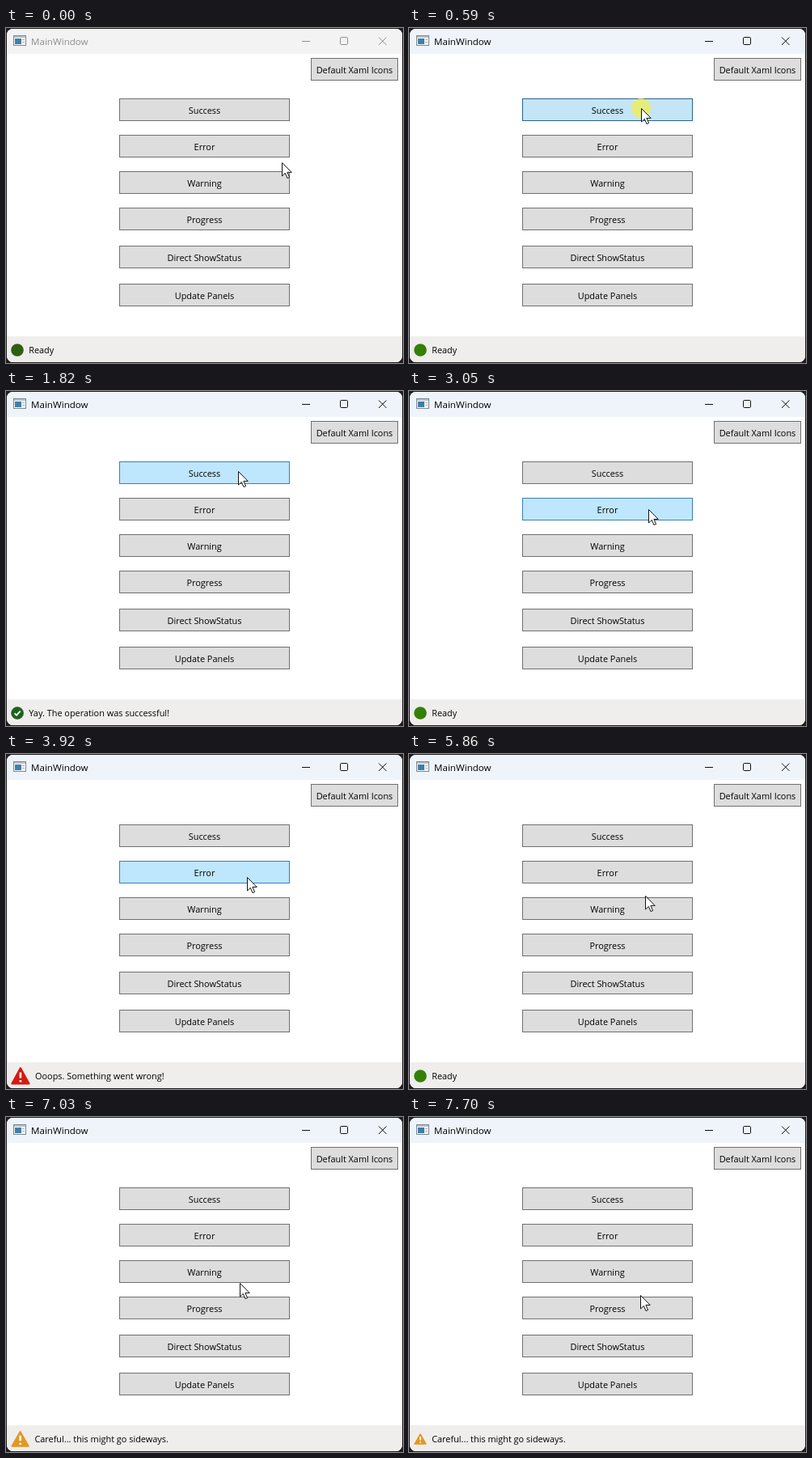
Recreate the animation shown at these times as an HTML page. Size 491 px wide and 414 px high, loop 8 s.

```html
<!DOCTYPE html>
<html lang="en">
<head>
<meta charset="utf-8">
<title>MainWindow</title>
<style>
  html, body { margin: 0; width: 100%; height: 100%; overflow: hidden; background: #201b1d; }
  svg { display: block; font: 10.9px "Open Sans", "Noto Sans", sans-serif; }
  .btn rect { fill: #ddd; stroke: #707070; }
  .btn.hover rect { fill: #bee6fd; stroke: #3c7fb1; }
  .btn.press rect { fill: #c4e5f6; stroke: #2c628b; }
  .btn text { text-anchor: middle; }
  .bar { fill: #eef4f9; }
  .title { font-size: 11.6px; }
  .sys { fill: none; stroke: #111; }
  .idle .bar { fill: #f3f3f3; }
  .idle .title { fill: #8d8d8d; }
  .idle .sys { stroke: #8d8d8d; }
</style>
</head>
<body>
<svg id="stage" width="491" height="414" viewBox="0 0 491 414">
  <clipPath id="frame"><rect x="1" y="1" width="489" height="412" rx="7.5"/></clipPath>
  <g clip-path="url(#frame)">
    <rect width="491" height="414" fill="#fff"/>
    <rect class="bar" width="491" height="32"/>
    <rect y="381" width="491" height="33" fill="#f0eded"/>
  </g>

  <g id="appIcon">
    <rect x="9.5" y="9.5" width="15" height="12" fill="#f6f8fa" stroke="#7d8790"/>
    <rect x="10" y="10" width="14" height="2" fill="#b9c3cc"/>
    <rect x="11" y="13" width="8" height="7" fill="#3f7fa6"/>
    <path d="M20 14.5h3M20 17.5h3" stroke="#a9b3bb"/>
  </g>
  <text class="title" x="31" y="21">MainWindow</text>
  <g class="sys">
    <path d="M366 16.5h10"/>
    <rect x="413.5" y="11.5" width="9" height="9" rx="1.2"/>
    <path d="M461 11.5l9.5 9.5M470.500 11.500l-9.500 9.500"/>
  </g>

  <g id="buttons"></g>

  <g id="icons">
    <circle data-kind="ready" cx="8" cy="8" r="7.8" fill="#348006"/>
    <g data-kind="success">
      <circle cx="8" cy="8" r="7.5" fill="#1c641c" stroke="#174c17" stroke-width=".5"/>
      <path d="M4.500 8.300l2.500 2.400 4.600-5" fill="none" stroke="#fff" stroke-width="1.800"/>
    </g>
    <g data-kind="error">
      <path d="M8 1.500L15 14.200H1z" fill="#d21c12" stroke="#d21c12" stroke-width="1.600" stroke-linejoin="round"/>
      <path d="M8 5v4.700M8 11.300v1.700" stroke="#fff" stroke-width="1.700"/>
    </g>
    <g data-kind="warning">
      <path d="M8 1.800L15 14H1z" fill="#e09a22" stroke="#e09a22" stroke-width="1.400" stroke-linejoin="round"/>
      <path d="M8 5v4.600M8 11.200v1.600" stroke="#fff" stroke-width="1.700"/>
    </g>
  </g>
  <text id="message" y="402"></text>

  <circle id="click" r="12" fill="#f0ee50" fill-opacity=".75"/>
  <path id="cursor" d="M.5 .5V17l3.800-3.600 2.700 6.200 2.600-1.100-2.700-6.100h5.300z" fill="#fff" stroke="#111" stroke-linejoin="round"/>
</svg>
<script>
const LOOP = 8000;
const PULSE = 590;          // one half of the icon's grow and shrink
const $ = id => document.getElementById(id);

const MESSAGES = {
  ready: 'Ready',
  success: 'Yay. The operation was successful!',
  error: 'Ooops. Something went wrong!',
  warning: 'Careful... this might go sideways.'
};

// press, release, end of message
const CLICKS = [
  { kind: 'success', down: 480, up: 650, end: 2180 },
  { kind: 'error', down: 3160, up: 3320, end: 5290 },
  { kind: 'warning', down: 6300, up: 6500, end: LOOP }
];

// time, x, y of the pointer tip
const PATH = [
  [0, 341, 166], [70, 341, 166], [220, 318, 138], [400, 287, 99],
  [2690, 287, 99], [2900, 296, 143], [3050, 296, 146], [3500, 298, 152],
  [5720, 298, 152], [5860, 292, 175], [6010, 290, 204], [6200, 290, 201],
  [6980, 290, 201], [7250, 286, 220], [LOOP, 286, 220]
];

const buttons = [
  [377, 37, 108, 'Default Xaml Icons'],
  [140, 87, 211, 'Success'],
  [140, 132, 211, 'Error'],
  [140, 177, 211, 'Warning'],
  [140, 222, 211, 'Progress'],
  [140, 269, 211, 'Direct ShowStatus'],
  [140, 316, 211, 'Update Panels']
].map(([x, y, w, label]) => {
  const el = make('g', { class: 'btn' }, $('buttons'));
  make('rect', { x: x + .5, y: y + .5, width: w - 1, height: 27 }, el);
  make('text', { x: x + w / 2, y: y + 19 }, el).textContent = label;
  return { el, x, y, w };
});
const icons = [...$('icons').children];

function make(tag, attrs, parent) {
  const el = document.createElementNS('http://www.w3.org/2000/svg', tag);
  for (const key in attrs) el.setAttribute(key, attrs[key]);
  return parent.appendChild(el);
}

function pointerAt(t) {
  const i = Math.max(1, PATH.findIndex(p => p[0] > t));
  const [t0, x0, y0] = PATH[i - 1], [t1, x1, y1] = PATH[i];
  const k = (t - t0) / (t1 - t0);
  return [Math.round(x0 + (x1 - x0) * k), Math.round(y0 + (y1 - y0) * k)];
}

function drawStatus(t) {
  const active = CLICKS.find(c => t >= c.up && t < c.end);
  const kind = active ? active.kind : 'ready';
  const age = active ? (t - active.up) / PULSE : 0;
  const size = 16 + 8 * Math.max(0, 1 - Math.abs(age - 1));
  for (const icon of icons)
    icon.style.display = icon.dataset.kind === kind ? '' : 'none';
  icons[0].setAttribute('fill', t < CLICKS[0].down ? '#2d6012' : '#348006');
  $('icons').setAttribute('transform', `translate(6 ${398 - size / 2}) scale(${size / 16})`);
  $('message').setAttribute('x', size + 12.2);
  $('message').textContent = MESSAGES[kind];
}

function draw(t) {
  const [x, y] = pointerAt(t);
  const pressed = CLICKS.some(c => t >= c.down && t < c.up);
  $('stage').classList.toggle('idle', t < CLICKS[0].down);
  for (const b of buttons) {
    const over = x >= b.x && x < b.x + b.w && y >= b.y && y < b.y + 28;
    b.el.classList.toggle('hover', over);
    b.el.classList.toggle('press', over && pressed);
  }
  const place = `translate(${x} ${y})`;
  $('cursor').setAttribute('transform', place);
  $('click').setAttribute('transform', place);
  $('click').style.display = pressed ? '' : 'none';
  drawStatus(t);
}

const start = performance.now();
function tick() {
  draw((performance.now() - start) % LOOP);
  requestAnimationFrame(tick);
}
tick();
</script>
</body>
</html>
```
